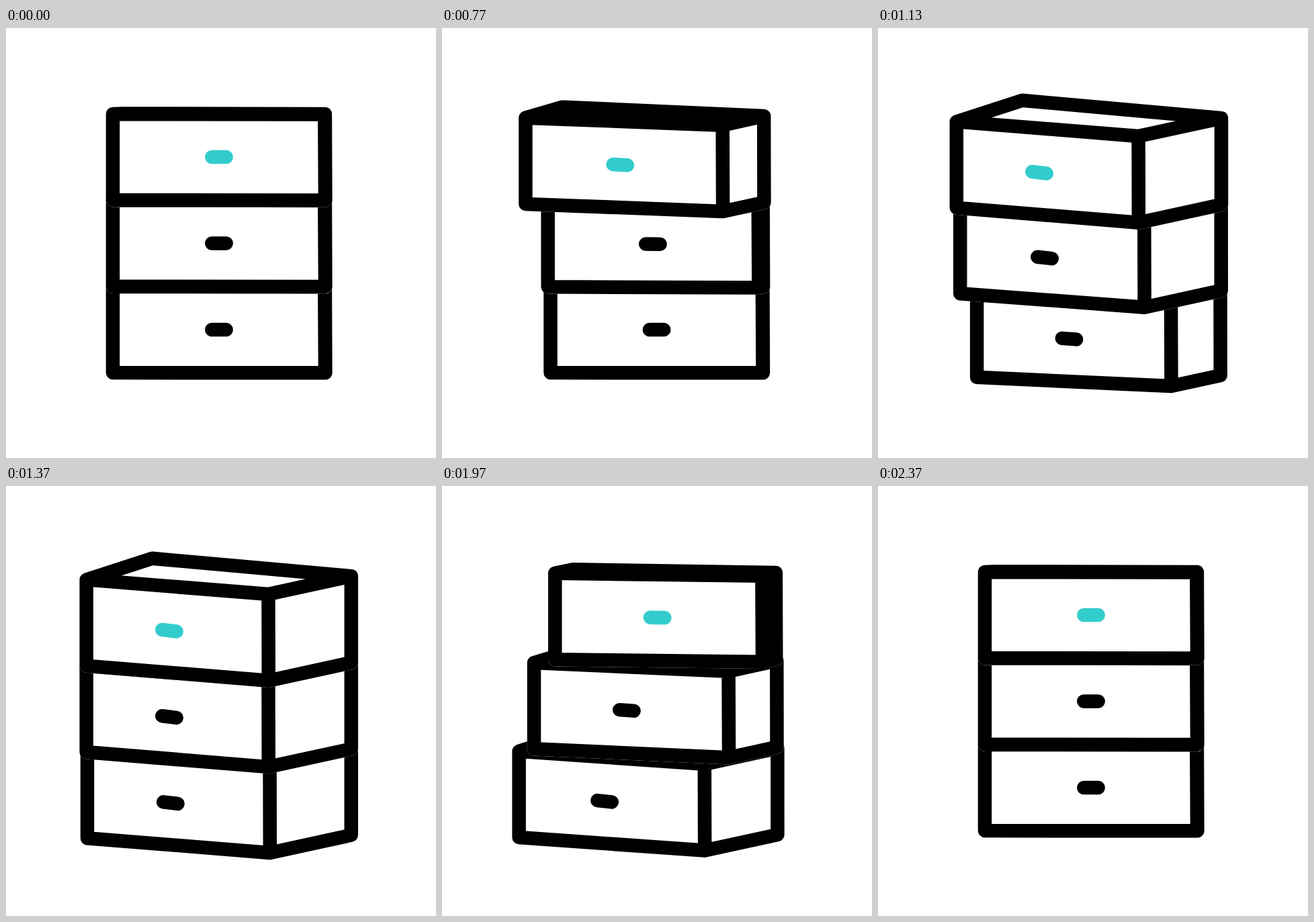
Animation, 640 px wide and 640 px high, one loop 2.5 s. Source, as an HTML page:

```html
<!DOCTYPE html>
<html lang="en">
<head>
<meta charset="utf-8">
<title>Drawers</title>
<style>
  html, body { margin: 0; width: 100%; height: 100%; overflow: hidden; background: #fff; }
  svg { display: block; width: 100%; height: 100%; }
  path { fill: none; stroke: #000; stroke-width: 20.5; stroke-linejoin: round; stroke-linecap: round; }
  .body { fill: #fff; stroke: #fff; }
  .accent { stroke: #3cc; }
</style>
</head>
<body>
<svg id="stage" viewBox="0 0 640 640"></svg>
<script>
const LOOP = 2500, FPS = 30;
const SPAN = 17, STAGGER = 5, OPEN = 16, CLOSE = 44;

// Corners of a drawer: [closed x, closed y, open x, open y]
const CORNERS = {
  a: [159, 128, 84.3, 139.4],      // front top left
  b: [474.3, 128.5, 355.1, 161],   // front top right
  c: [474.9, 128, 478.4, 134.2],   // back top right
  d: [172, 127.4, 182.2, 107.8],   // back top left
  e: [159, 256.3, 84.3, 267.6],    // front bottom left
  f: [475, 256.5, 355.4, 289.7],   // front bottom right
  g: [475.4, 256.5, 478.4, 262.9], // back bottom right
  h: [306.3, 192.1, 196.9, 213.9], // handle ends
  i: [327.7, 192.1, 218.3, 216.5]
};
const SHELL = 'aefgcd', FACES = ['abfe', 'bcgf', 'abcd'];

const clamp = x => Math.min(1, Math.max(0, x));
const smooth = x => x * x * (3 - 2 * x);

// Cubic bezier easing with control points (x1, 0) and (x2, 1)
function bezier(x1, x2) {
  return x => {
    let lo = 0, hi = 1;
    for (let n = 0; n < 24; n++) {
      const s = (lo + hi) / 2, r = 1 - s;
      if (3 * x1 * s * r * r + 3 * x2 * s * s * r + s * s * s < x) lo = s;
      else hi = s;
    }
    return smooth(lo);
  };
}
const easeOpen = bezier(0.3, 0.47);
const easeClose = bezier(0.45, 0.95);

const svg = document.getElementById('stage');
function addPath(parent, cls) {
  const el = document.createElementNS(svg.namespaceURI, 'path');
  if (cls) el.setAttribute('class', cls);
  parent.append(el);
  return el;
}

// Lowest drawer first, so that upper ones overlap it
const drawers = [2, 1, 0].map(row => ({
  row,
  y: row * 128.4,
  shell: addPath(svg, 'body'),
  edges: addPath(svg),
  handle: addPath(svg, row ? '' : 'accent')
}));

function openness(row, k) {
  const start = row * STAGGER;
  if (k <= OPEN + start) return 0;
  if (k < CLOSE) return easeOpen(clamp((k - OPEN - start) / SPAN));
  const q = clamp((k - CLOSE - start) / SPAN);
  return q < 1 ? 1 - easeClose(q) : 0;
}

function shift(k) {
  return 35.4 * (smooth(clamp((k - 20.3) / 16.6)) - smooth(clamp((k - 52.1) / 16)));
}

function draw(k) {
  const dx = shift(k);
  for (const { row, y, shell, edges, handle } of drawers) {
    const p = openness(row, k);
    const line = keys => 'M' + [...keys].map(key => {
      const [x0, y0, x1, y1] = CORNERS[key];
      return (x0 + (x1 - x0) * p + dx).toFixed(2) + ' ' + (y0 + (y1 - y0) * p + y).toFixed(2);
    }).join('L');
    shell.setAttribute('d', line(SHELL) + 'Z');
    edges.setAttribute('d', FACES.map(keys => line(keys) + 'Z').join(''));
    handle.setAttribute('d', line('hi'));
  }
}

function tick() {
  const t = performance.now() % LOOP;
  // Stepped at 30 pictures per second
  draw(Math.floor(t * FPS / 1000 + 0.15));
  requestAnimationFrame(tick);
}
tick();
</script>
</body>
</html>
```
